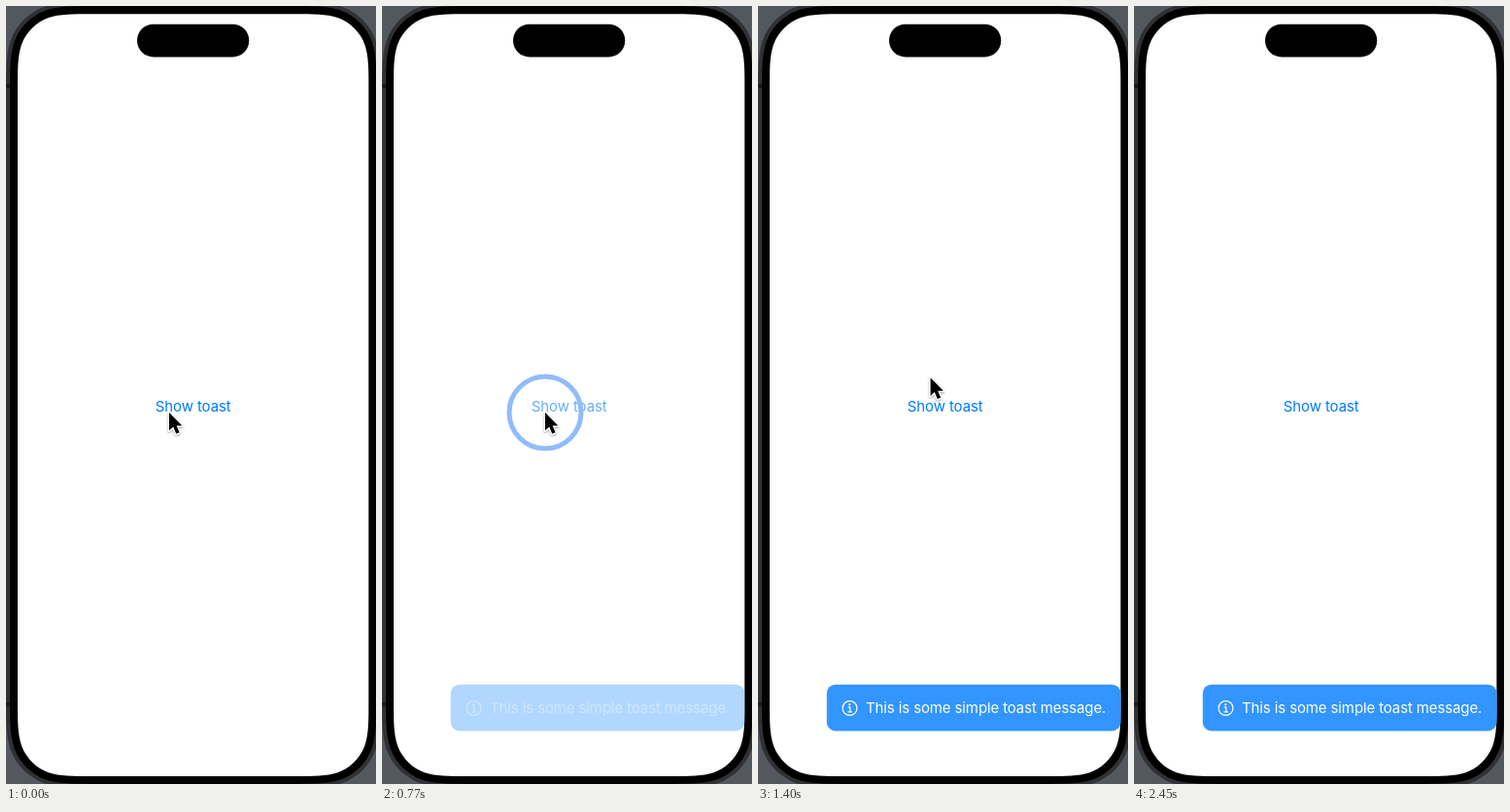
Write an HTML page that moves like this. It is 381 px wide and 800 px high and loops after 3.01 s.

```html
<!DOCTYPE html>
<html lang="en">
<head>
<meta charset="utf-8">
<title>Toast demo</title>
<style>
  html, body { margin: 0; width: 100%; height: 100%; overflow: hidden; background: #53585e; }
  svg { display: block; width: 381px; height: 800px; }
  text { font-family: Inter, "Liberation Sans", sans-serif; font-size: 15px; letter-spacing: -.12px; }
</style>
</head>
<body>
<svg viewBox="0 0 381 800">
  <defs>
    <filter id="shadow" x="-50%" y="-50%" width="200%" height="200%">
      <feDropShadow dx="0" dy="1.2" stdDeviation="1.2" flood-opacity=".4"/>
    </filter>
  </defs>

  <rect width="381" height="800" fill="#53585e"/>
  <path id="rim" fill="#303134"/>
  <path d="M0 80h4v4h-4zM0 716h4v4h-4z" fill="#191a1b"/>
  <path id="bezel"/>
  <path id="screen" fill="#fff"/>
  <rect x="135" y="18.7" width="115.3" height="33.7" rx="16.8"/>

  <text id="button" x="192.7" y="417.3" text-anchor="middle" fill="#007aff">Show toast</text>

  <rect id="panel" x="70.8" y="697.7" width="302.7" height="47.8" rx="9" fill="#3395ff"/>
  <g id="message" fill="#fff">
    <circle cx="94.5" cy="722" r="7.4" fill="none" stroke="#fff" stroke-width="1.2"/>
    <circle cx="94.3" cy="718.4" r="1.1"/>
    <path d="M92.7 721.2h2.1v4.6M92.5 725.8h4.4" fill="none" stroke="#fff" stroke-width="1.2"/>
    <text x="111" y="727.3">This is some simple toast message.</text>
  </g>

  <circle id="ring" cx="168" cy="418" fill="none" stroke="#8fbcfb"/>
  <g id="cursor" filter="url(#shadow)">
    <path d="M0 0V18.6L4.2 14.7 7.2 21.8 10.6 20.4 7.6 13.4H13.3Z"
          stroke="#fff" stroke-width="2.6" stroke-linejoin="round" paint-order="stroke"/>
  </g>
</svg>
<script>
  const LOOP = 3010, STEP = 70, PRESS = 630;
  const el = id => document.getElementById(id);

  // Rounded rectangle with continuous-curvature corners of nominal radius r
  function squircle(left, top, right, bottom, r) {
    const far = 1.53 * r, mid = .63 * r, near = .075 * r;
    const corner = (x, y, sx, sy) => {
      const p = (a, b) => `${x + sx * a} ${y + sy * b}`;
      const points = [
        p(0, far), p(0, 1.09 * r), p(0, .87 * r), p(near, mid),
        p(.17 * r, .37 * r), p(.37 * r, .17 * r), p(mid, near),
        p(.87 * r, 0), p(1.09 * r, 0), p(far, 0)
      ];
      if (sx !== sy) points.reverse();
      return `${points[0]}C${points.slice(1).join(' ')}`;
    };
    return 'M' + [
      corner(left, top, 1, 1), corner(right, top, -1, 1),
      corner(right, bottom, -1, -1), corner(left, bottom, 1, -1)
    ].join('L') + 'Z';
  }
  el('screen').setAttribute('d', squircle(12, 8.3, 373.4, 792, 50.6));
  el('bezel').setAttribute('d', squircle(4, 0, 381.4, 800, 58.6));
  el('rim').setAttribute('d', squircle(0, -4, 385.4, 804, 62.6));

  const progress = (t, from, to) => Math.min(1, Math.max(0, (t - from) / (to - from)));
  const easeOut = p => Math.sin(p * Math.PI / 2);
  const easeInOut = p => p * p * (3 - 2 * p);
  const curve = (p, a, b, c) => (1 - p) ** 2 * a + 2 * p * (1 - p) * b + p * p * c;

  function draw(t) {
    const toast = easeOut(progress(t, 655, 1120));
    el('panel').style.opacity = toast;
    el('message').style.opacity = toast;
    el('button').style.opacity = t < PRESS ? 1 : .2 + .8 * easeOut(progress(t, PRESS, 1050));

    const radius = 50 * easeOut(progress(t, 524, 948));
    const width = Math.min(radius, 8 * (1 - progress(t, 665, 945)));
    const ring = el('ring');
    ring.setAttribute('r', radius - width / 2);
    ring.setAttribute('stroke-width', width);
    ring.style.display = t >= PRESS && width > 0 ? '' : 'none';

    const move = easeInOut(progress(t, 980, 1400));
    const x = curve(move, 168, 204, 177.6), y = curve(move, 418, 414, 382.3);
    el('cursor').setAttribute('transform', `translate(${x} ${y})`);
    el('cursor').style.opacity = 1 - progress(t, 2100, 2310);
  }

  const start = performance.now();
  function frame() {
    const t = (performance.now() - start) % LOOP;
    draw(Math.floor(t / STEP) * STEP);
    requestAnimationFrame(frame);
  }
  frame();
</script>
</body>
</html>
```
